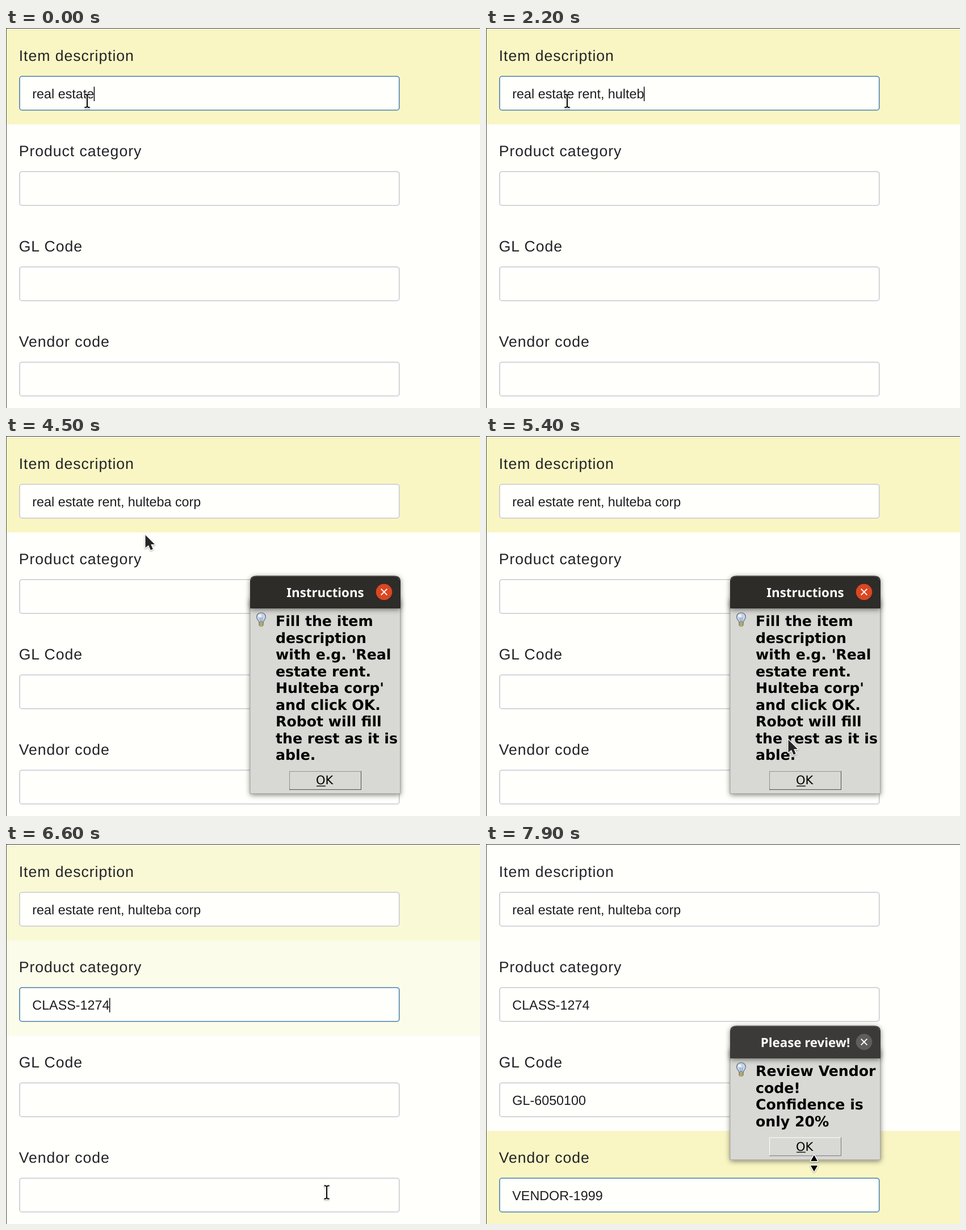
These frames come from a looping animation (835 by 670 pixels, 8 s). An HTML page:

```html
<!DOCTYPE html>
<html lang="en">
<head>
<meta charset="utf-8">
<title>Form filling</title>
<style>
  html, body { margin: 0; width: 100%; height: 100%; overflow: hidden; background: #fffffc; }
  svg { display: block; width: 835px; height: 670px; }
  text { white-space: pre; text-rendering: geometricPrecision; }
  .label { font: 26.67px "Liberation Sans", Arial, sans-serif; letter-spacing: .94px; fill: #232326; }
  .value { font: 23.33px "Liberation Sans", Arial, sans-serif; fill: #1d1d20; }
  .box { fill: #fffffc; stroke-width: 1.6; }
  .title { font: 700 22.3px "Noto Sans", "Open Sans", sans-serif; fill: #fff; text-anchor: middle; }
  .msg { font: 700 25.2px "DejaVu Sans", sans-serif; }
  .ok { font: 21px "DejaVu Sans", sans-serif; }
  .frame { filter: drop-shadow(0 2px 5px rgba(0, 0, 0, .5)); }
  .cursor { filter: drop-shadow(0 1px 1px rgba(0, 0, 0, .35)); }
  .line { fill: none; }
</style>
</head>
<body>
<svg id="stage" viewBox="0 0 835 670"></svg>
<script>
const LOOP = 8000, TICK = 100, BAND = 168, TEXT_X = 46.3;
const NS = "http://www.w3.org/2000/svg";
const stage = document.getElementById("stage");

function add(parent, tag, attrs = {}, text) {
  const el = document.createElementNS(NS, tag);
  for (const k in attrs) el.setAttribute(k, attrs[k]);
  if (text !== undefined) el.textContent = text;
  parent.appendChild(el);
  return el;
}
const show = (el, on) => el.setAttribute("visibility", on ? "visible" : "hidden");
const at = (el, x, y) => el.setAttribute("transform", `translate(${x} ${y})`);
const latest = (steps, t) => steps.filter(s => s[0] <= t).pop();

// Form
const fields = ["Item description", "Product category", "GL Code", "Vendor code"].map((name, i) => {
  const g = add(stage, "g", { transform: `translate(0 ${i * BAND})` });
  return {
    band: add(g, "rect", { x: 0, y: 2, width: 835, height: BAND }),
    label: add(g, "text", { class: "label", x: 22.7, y: 57.5 }, name),
    box: add(g, "rect", { class: "box", x: 24, y: 85.3, width: 668.7, height: 59.4, rx: 4 }),
    value: add(g, "text", { class: "value", x: TEXT_X, y: 124 }),
    caret: add(g, "rect", { y: 103.5, width: 1.6, height: 25.5, fill: "#111" })
  };
});
let wave = "M215.5 128";
for (let i = 0; i < 22; i++) wave += `l3.45 ${i % 2 ? 3 : -3}`;
const squiggle = add(stage, "path", { class: "line", d: wave, stroke: "#d3202e", "stroke-width": 1.7, "stroke-linejoin": "round" });
add(stage, "rect", { width: 835, height: 1, fill: "#3a3a38" });
add(stage, "rect", { width: 1, height: 670, fill: "#4a4a48" });

// Dialogs
function bulb(g) {
  const b = add(g, "g", { transform: "translate(19.5 75)" });
  add(b, "path", { d: "M-3.5 8C-3.5 4-8 3-8-2A8 7.5 0 0 1 8-2C8 3 3.5 4 3.5 8Z", fill: "#c3d5ec", stroke: "#69717d", "stroke-width": 1.2 });
  add(b, "ellipse", { cx: -2.5, cy: -4, rx: 3, ry: 2.5, fill: "#f1f6fc" });
  add(b, "path", { class: "line", d: "M-2-1L-1 7M2-1L1 7", stroke: "#7c8ba1" });
  add(b, "rect", { x: -3.5, y: 7, width: 7, height: 7, rx: 2, fill: "#d6cc83", stroke: "#5d5a3e" });
  add(b, "path", { class: "line", d: "M-3 10.5H3", stroke: "#5d5a3e" });
}

function dialog(y, title, lines, active) {
  const root = add(stage, "g", { transform: `translate(430 ${y})` });
  const h = 119 + lines.length * 29.55, top = h - 40;
  const body = add(root, "g");
  add(body, "rect", { class: "frame", y: 40, width: 265, height: h - 40, fill: "#d8d8d4" });
  const head = add(root, "g");
  add(head, "path", { class: "frame", d: "M0 58V11Q0 .5 10.5 .5H254.5Q265 .5 265 11V58Z", fill: active ? "#2d2c29" : "#3c3a38" });
  add(head, "path", { class: "line", d: "M2 8Q4 1.3 11 1.3H254Q261 1.3 263 8", stroke: active ? "#55544f" : "#5b5956" });
  add(head, "text", { class: "title", x: 132.5, y: 38 }, title);
  add(head, "circle", { cx: 236, cy: 29, r: 14.3, fill: active ? "#dc4622" : "#605e5b" });
  add(head, "path", { class: "line", d: "M230.7 23.7l10.6 10.6m0-10.6l-10.6 10.6", stroke: "#fff", "stroke-width": 1.9 });
  add(body, "rect", { x: 0, y: 58, width: 265, height: h - 58, fill: "#d8d8d4" });
  add(body, "path", { class: "line", d: `M0 58V${h - .5}H264.5V58`, stroke: "#a5a5a0" });
  bulb(body);
  lines.forEach((s, i) => add(body, "text", { class: "msg", x: 45, y: 89 + i * 29.5 }, s));
  const face = add(body, "rect", { x: 69, y: top, width: 127, height: 33, fill: "#d8d8d4" });
  add(body, "path", { class: "line", d: `M69.5 ${top + 32}V${top + .5}H195`, stroke: "#fff" });
  add(body, "path", { class: "line", d: `M69 ${top + 32.5}H195.5V${top}`, stroke: "#777" });
  if (active) add(body, "rect", { class: "line", x: 69.5, y: top + .5, width: 126, height: 32, stroke: "#222", "stroke-dasharray": "1 1" });
  add(body, "text", { class: "ok", x: 116, y: top + 23.5 }, "OK");
  add(body, "rect", { x: 117, y: top + 25.6, width: 16, height: 1.3 });
  return { root, head, body, face };
}
const intro = dialog(246, "Instructions", ["Fill the item", "description", "with e.g. 'Real", "estate rent.",
  "Hulteba corp'", "and click OK.", "Robot will fill", "the rest as it is", "able."], true);
const review = dialog(320, "Please review!", ["Review Vendor", "code!", "Confidence is", "only 20%"], false);

// Mouse cursors
const cursors = {};
function cursor(name, d, attrs, halo) {
  const g = cursors[name] = add(stage, "g", { class: "cursor" });
  add(g, "path", { d, fill: "none", stroke: "#fff", "stroke-width": halo, "stroke-linejoin": "round" });
  add(g, "path", { d, ...attrs });
}
cursor("beam", "M-4.5-11.5H-2L0-10L2-11.5H4.5M0-10V10M-4.5 11.5H-2L0 10L2 11.5H4.5",
  { fill: "none", stroke: "#000", "stroke-width": 2 }, 4.4);
cursor("arrow", "M1.5 2.5V25L7 20.5L10.8 29L14.8 27.2L11.2 19H18Z", { fill: "#262626" }, 3);
cursor("resize", "M0-14.5L6-4H-6ZM0 14.5L6 4H-6Z", { fill: "#000" }, 3);

const moves = [
  [0, "beam", 143, 128.5], [4500, "arrow", 244, 172], [4900, "arrow", 312, 232], [5000, "arrow", 377, 288],
  [5200, "arrow", 433, 372], [5300, "arrow", 502, 484], [5400, "arrow", 531, 533], [5600, "arrow", 552, 580],
  [5700, "arrow", 565, 612], [5900, "beam", 565, 614], [7800, "beam", 571, 592], [7900, "resize", 578, 563]
];

// Typing: time and number of characters present
const phrase = "real estate rent, hulteba corp";
const keys = [[0, 11], [200, 12], [500, 14], [700, 15], [1000, 16], [1100, 17], [1400, 18], [1600, 20], [1800, 21],
  [2000, 22], [2200, 24], [2400, 25], [2600, 26], [2900, 27], [3000, 28], [3100, 29], [3400, 30]];
const fills = [[6500, "CLASS-1274"], [6700, "GL-6050100"], [6900, "VENDOR-1999"]];

// Highlight fades
const starts = [-999, 6480, 6690, 6910, 99999];
const ease = (t, from) => {
  const p = Math.min(1, Math.max(0, (t - from) / 300));
  return p < .5 ? 2 * p * p : 1 - 2 * (1 - p) * (1 - p);
};
const tint = a => `rgb(${255 - 6 * Math.sqrt(a)} ${255 - 9 * a} ${252 - 56 * a})`;

function focusAt(t) {
  if (t < 4500) return 0;
  return t < 6500 ? -1 : t < 6700 ? 1 : t < 6900 ? 2 : 3;
}

function draw(t) {
  const focus = focusAt(t);
  fields.forEach((f, i) => {
    const text = i ? (t >= fills[i - 1][0] ? fills[i - 1][1] : "") : phrase.slice(0, latest(keys, t)[1]);
    if (f.value.textContent !== text) f.value.textContent = text;
    f.band.setAttribute("fill", tint(ease(t, starts[i]) * (1 - ease(t, starts[i + 1]))));
    f.box.setAttribute("stroke", i === focus ? "#4a80b0" : "#c9c9d0");
    const blinkOff = i ? t >= 7600 : t >= 3900;
    show(f.caret, i === focus && !blinkOff);
    f.caret.setAttribute("x", TEXT_X - .6 + (text ? f.value.getComputedTextLength() : 0));
  });
  show(squiggle, t >= 2600 && t < 4500);
  show(intro.root, t >= 4500 && t < 5900);
  intro.face.setAttribute("fill", t >= 5700 ? "#ececec" : "#d8d8d4");
  show(review.head, t >= 7300);
  show(review.body, t >= 7400);
  const [, kind, x, y] = latest(moves, t);
  for (const k in cursors) show(cursors[k], k === kind);
  at(cursors[kind], x, y);
}

let origin;
function loop(now) {
  origin ??= now;
  draw(Math.floor((now - origin) % LOOP / TICK) * TICK);
  requestAnimationFrame(loop);
}
draw(0);
requestAnimationFrame(loop);
</script>
</body>
</html>
```
